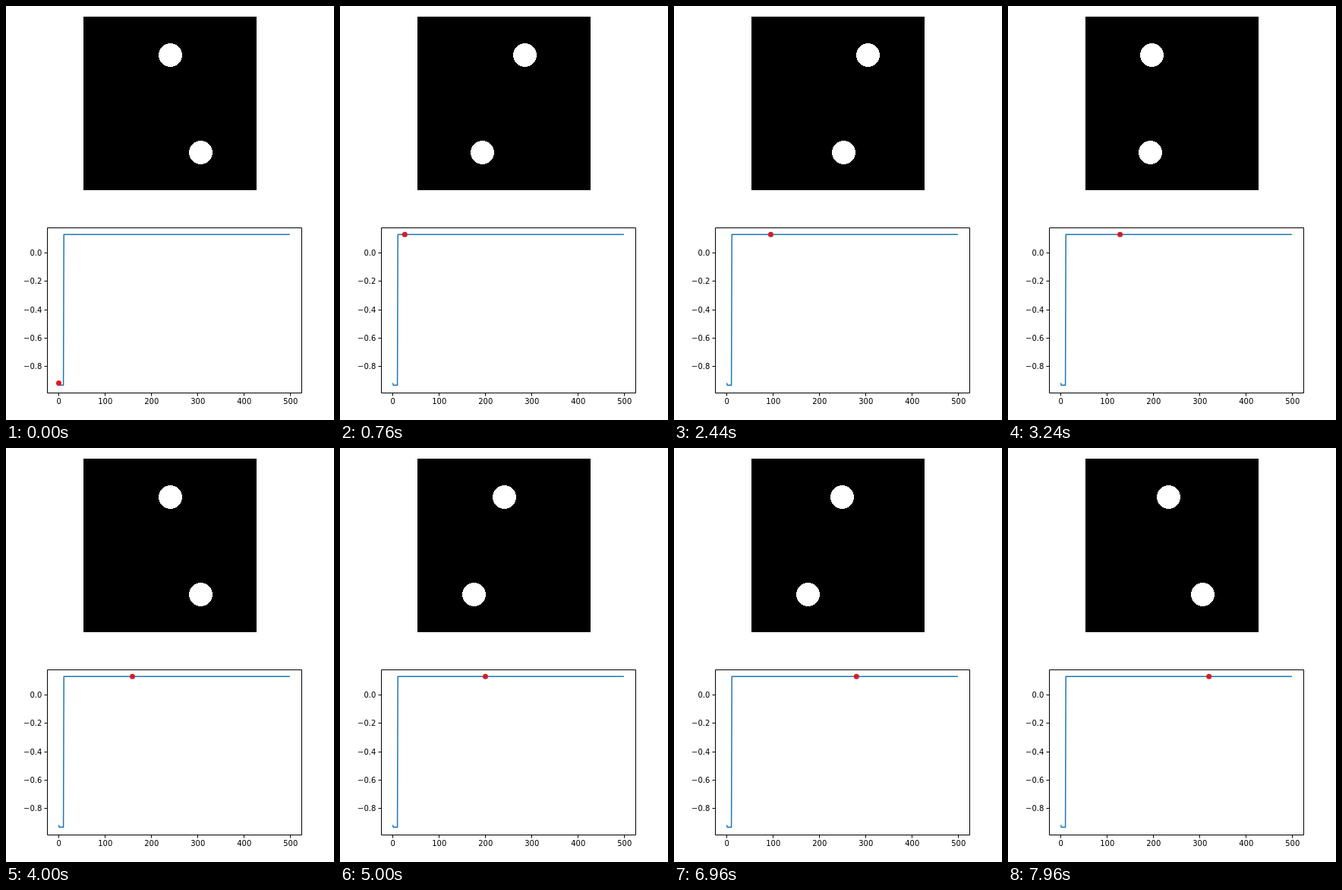
Animation, 432 px wide and 544 px high, one loop 8000 ms. Source, as an HTML page:

```html
<!DOCTYPE html>
<html>
<head>
<meta charset="utf-8">
<style>
  html, body { margin: 0; width: 100%; height: 100%; overflow: hidden; background: #fff; }
  svg { display: block; }
  text { font: 10px "DejaVu Sans", sans-serif; }
</style>
</head>
<body>
<svg id="stage" width="432" height="544" viewBox="0 0 432 544">
  <rect x="102" y="14" width="228" height="228"/>
  <g fill="#fff" shape-rendering="crispEdges">
    <circle id="top" cy="64.5" r="15.5"/>
    <circle id="bottom" cy="192.5" r="15.5"/>
  </g>
  <g id="axes" stroke="#000"></g>
  <g id="labels"></g>
  <path id="curve" fill="none" stroke="#1f77b4" stroke-width="1.5" stroke-linejoin="round"/>
  <circle id="dot" r="3.5"/>
</svg>
<script>
const LOOP = 8000, STEP = 40, PERIOD = 50;
const SAMPLES = 500, JUMP = 11;
const $ = id => document.getElementById(id);

const px = v => 69.5 + v * 0.61;
const py = v => 324.5 - v * 186.75;
const signal = i => i < 1 ? -0.915 : i < JUMP ? -0.93 : 0.13;

function add(parent, tag, attrs, text = '') {
  const el = document.createElementNS('http://www.w3.org/2000/svg', tag);
  for (const k in attrs) el.setAttribute(k, attrs[k]);
  el.textContent = text;
  parent.appendChild(el);
}

function drawChart() {
  let ticks = 'M54.5 291.5H389.5V508.5H54.5Z';
  for (let v = 0; v <= SAMPLES; v += 100) {
    ticks += `M${px(v)} 508.5v4`;
    add($('labels'), 'text', { x: px(v) + 0.3, y: 523, 'text-anchor': 'middle' }, v);
  }
  for (let n = 0; n < 5; n++) {
    const v = n * 0.2, y = Math.floor(py(-v)) + 0.5;
    ticks += `M54.5 ${y}h-4`;
    add($('labels'), 'text', { x: 47.3, y: y + 3.7, 'text-anchor': 'end' },
      (n ? '\u2212' : '') + v.toFixed(1));
  }
  add($('axes'), 'path', { d: ticks, fill: 'none', 'stroke-width': 1 });

  const points = [0, 1, JUMP - 1, JUMP, SAMPLES - 1];
  $('curve').setAttribute('d', 'M' + points.map(i => `${px(i)} ${py(signal(i))}`).join('L'));
}

function render(ms) {
  const k = Math.floor(ms % LOOP / STEP);
  const a = k / PERIOD * 2 * Math.PI;
  $('top').setAttribute('cx', Math.round(40 * Math.sin(a)) + 216.5);
  $('bottom').setAttribute('cx', Math.round(40 * Math.cos(a)) + 216.5);

  const i = Math.max(0, Math.round(k * 1.634 - 4.7));
  $('dot').setAttribute('cx', px(i));
  $('dot').setAttribute('cy', py(signal(i)));
  $('dot').setAttribute('fill', i < JUMP ? '#ee141c' : '#d01f29');
}

drawChart();
render(0);
const start = performance.now();
(function tick() {
  render(performance.now() - start);
  requestAnimationFrame(tick);
})();
</script>
</body>
</html>
```
